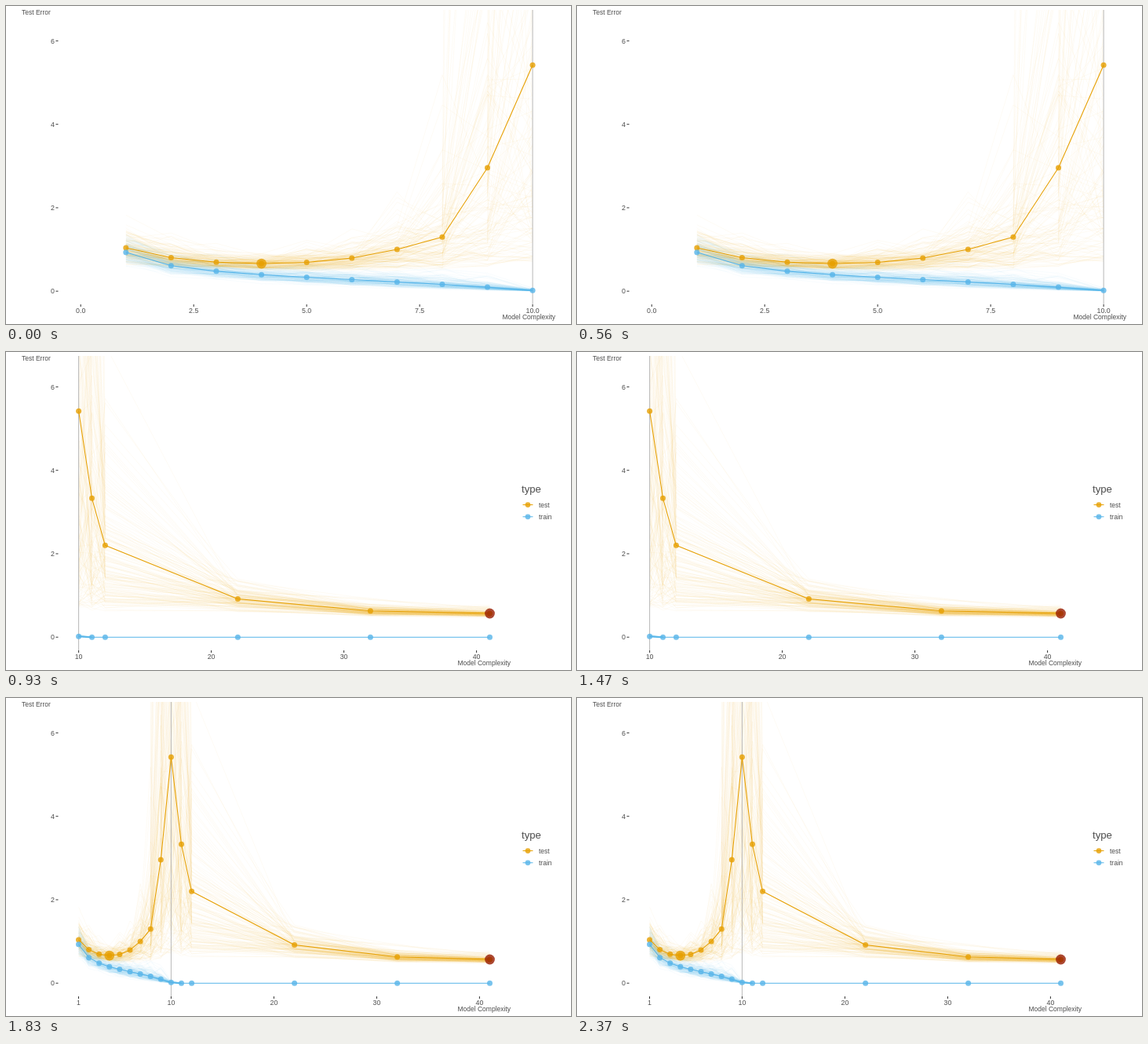
Recreate the animation shown at these times as an HTML page with a canvas. Size 720 by 405 pixels, loop 2.73 s.

```html
<!DOCTYPE html>
<html lang="en">
<head>
<meta charset="utf-8">
<title>Test error and model complexity</title>
<style>
html, body { margin: 0; width: 100%; height: 100%; overflow: hidden; background: #fff; }
canvas { display: block; }
</style>
</head>
<body>
<canvas id="chart" width="720" height="405"></canvas>
<script>
const ctx = document.getElementById('chart').getContext('2d');
const ORANGE = '#e69f00', BLUE = '#56b4e9', RED = '#971c00', INK = '#4d4d4d';
const TOP = 5, BOTTOM = 380, RUNS = 150, PEAK = 10;
const series = [['test', ORANGE], ['train', BLUE]];

const scenes = [
  { until: 930, origin: 95.2, step: 57.59, from: 1, to: 10, right: 700,
    ticks: ['0.0', '2.5', '5.0', '7.5', '10.0'] },
  { until: 1830, origin: -76.4, step: 16.9, from: 10, to: 41, right: 643,
    ticks: ['10', '20', '30', '40'], legend: true },
  { until: 2730, origin: 79.4, step: 13.1, from: 1, to: 41, right: 643,
    ticks: ['1', '10', '20', '30', '40'], legend: true }
];

const testMeans = [1.04, .805, .695, .662, .69, .795, 1, 1.297, 2.96, 5.42, 3.33, 2.2, .917, .628, .568];
const trainMean = x => x > PEAK ? 0 : .93 * x ** -.6 - .217 * (x / PEAK) ** 3.3;

// Complexity grows by 1 up to 12, then by 10, and ends at 41.
const means = testMeans.map((test, i) => {
  const x = i < 12 ? i + 1 : Math.min(12 + 10 * (i - 11), 41);
  return { x, test, train: trainMean(x) };
});

let seed = 71;
function random() {
  seed = (seed * 16807) % 2147483647;
  return seed / 2147483647;
}
const normal = () => Math.sqrt(-2 * Math.log(random())) * Math.cos(2 * Math.PI * random());

// A single run scatters log-normally around the means, most widely at the peak.
function makeRun() {
  const bias = normal(), fit = normal();
  return means.map(({ x, test, train }) => {
    const near = 1 / (1 + ((x - PEAK) / 2) ** 2);
    const sigma = .35 + .95 * near;
    const low = .4 + .05 * test;
    const blowUp = random() < .1 * near ** 6 ? 25 : 1;
    const z = .75 * bias + .66 * normal();
    const w = .8 * fit + .6 * normal();
    return {
      x,
      test: low + (test - low) * blowUp * Math.exp(sigma * z - sigma * sigma / 2),
      train: train * Math.exp((.17 + .005 * x * x) * w)
    };
  });
}
const runs = Array.from({ length: RUNS }, makeRun);

const py = v => 363.2 - 53.13 * v;

function segment(x1, y1, x2, y2, color, width = 1) {
  ctx.strokeStyle = color;
  ctx.lineWidth = width;
  ctx.beginPath();
  ctx.moveTo(x1, y1);
  ctx.lineTo(x2, y2);
  ctx.stroke();
}

function dot(x, y, radius, color) {
  ctx.globalAlpha = .8;
  ctx.fillStyle = color;
  ctx.beginPath();
  ctx.arc(x, y, radius, 0, 2 * Math.PI);
  ctx.fill();
  ctx.globalAlpha = 1;
}

function label(text, x, y, size = 8.5, align = 'left') {
  ctx.font = `${size}px "Liberation Sans", Arial, sans-serif`;
  ctx.textAlign = align;
  ctx.fillStyle = INK;
  ctx.fillText(text, x, y);
}

function drawAxes(scene, px) {
  label('Test Error', 20, 11.2);
  label('Model Complexity', scene.right, 399.3, 8.5, 'right');
  for (let v = 0; v <= 6; v += 2) {
    label(v, 61.8, py(v) + 3.2, 8.8, 'right');
    segment(63.5, py(v), 66.5, py(v), '#333');
  }
  for (const t of scene.ticks) {
    label(t, px(+t), 390.6, 8.8, 'center');
    segment(px(+t), BOTTOM, px(+t), BOTTOM + 3, '#333');
  }
}

function drawLegend() {
  label('type', 657, 179, 13.2);
  series.forEach(([name, color], i) => {
    const y = 194.6 + 15.2 * i;
    segment(658.5, y, 671.5, y, color);
    dot(665, y, 3.4, color);
    label(name, 679, y + 3.2);
  });
}

function drawScene(scene) {
  const px = v => scene.origin + scene.step * v;
  const inView = p => p.x >= scene.from && p.x <= scene.to;
  const trace = (data, key, color, width) => {
    ctx.strokeStyle = color;
    ctx.lineWidth = width;
    ctx.beginPath();
    for (const p of data.filter(inView)) ctx.lineTo(px(p.x), py(p[key]));
    ctx.stroke();
  };

  ctx.fillStyle = '#fff';
  ctx.fillRect(0, 0, 720, 405);
  drawAxes(scene, px);

  ctx.save();
  ctx.beginPath();
  ctx.rect(66, TOP, 640, BOTTOM - TOP);
  ctx.clip();
  ctx.lineJoin = 'bevel';
  ctx.globalAlpha = .055;
  for (const run of runs) {
    trace(run, 'test', ORANGE, .8);
    trace(run.filter(p => p.x <= PEAK + 1), 'train', BLUE, .8);
  }
  ctx.globalAlpha = 1;
  segment(px(PEAK), TOP, px(PEAK), BOTTOM, '#b8b8b8');
  for (const [key, color] of series) trace(means, key, color, 1.05);
  for (const p of means.filter(inView)) {
    for (const [key, color] of series) dot(px(p.x), py(p[key]), 3.5, color);
    if (p.x === 4) dot(px(p.x), py(p.test), 6.4, ORANGE);
    if (p.x === 41) dot(px(p.x), py(p.test), 6.4, RED);
  }
  ctx.restore();

  if (scene.legend) drawLegend();
}

let shown;
function frame() {
  const time = performance.now() % 2730;
  const scene = scenes.find(s => time < s.until);
  if (scene !== shown) drawScene(shown = scene);
  requestAnimationFrame(frame);
}
frame();
</script>
</body>
</html>
```
